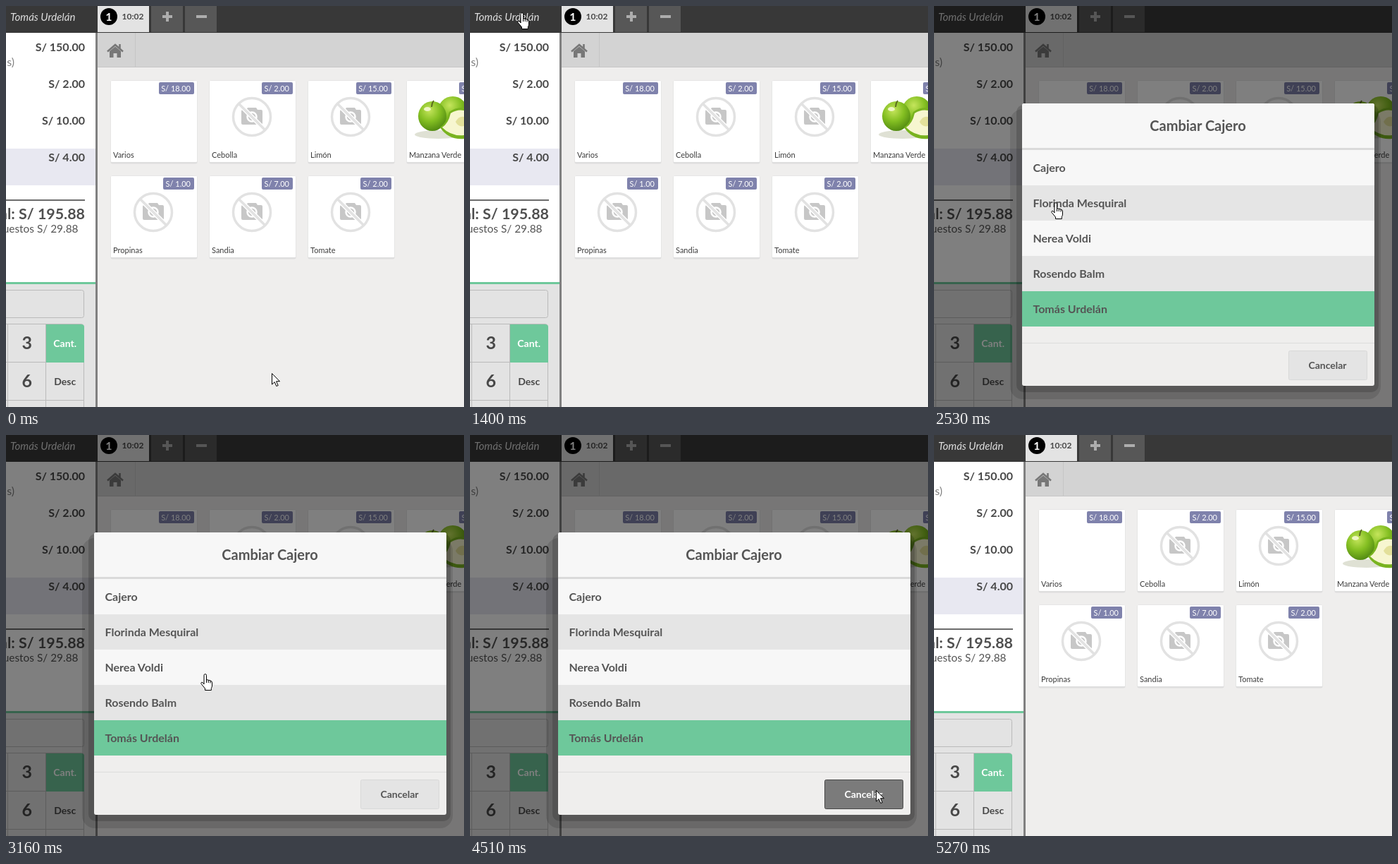
An HTML page for the animation above (5520 ms loop, 650 px wide and 568 px high).

```html
<!DOCTYPE html>
<html lang="es">
<head>
<meta charset="utf-8">
<title>Cambiar cajero</title>
<style>
html, body { margin: 0; width: 100%; height: 100%; overflow: hidden; background: #efeeed; }
svg { display: block; width: 650px; height: 568px; font-family: Lato, "Open Sans", sans-serif; }
</style>
</head>
<body>
<svg id="stage" viewBox="0 0 650 568" xmlns="http://www.w3.org/2000/svg"></svg>
<script>
const LOOP = 5520, STEP = 120;
const GREEN = '#6ec89b', INK = '#484848';
const CASHIER = 'Tomás Urdelán';

const rect = (x, y, w, h, fill, extra = '') =>
  `<rect x="${x}" y="${y}" width="${w}" height="${h}" fill="${fill}" ${extra}/>`;
const path = (d, fill, extra = '') => `<path d="${d}" fill="${fill}" ${extra}/>`;
const ellipse = (x, y, rx, ry, fill, extra = '') =>
  `<ellipse cx="${x}" cy="${y}" rx="${rx}" ry="${ry}" fill="${fill}" ${extra}/>`;
const text = (str, x, y, size, fill, { bold = false, anchor = 'start', extra = '' } = {}) =>
  `<text x="${x}" y="${y}" font-size="${size}" fill="${fill}" font-weight="${bold ? 700 : 400}" text-anchor="${anchor}" ${extra}>${str}</text>`;

const boldEnd = { bold: true, anchor: 'end' };
const boldMid = { bold: true, anchor: 'middle' };

function header() {
  return rect(0, 0, 650, 38, '#383838') +
    text(CASHIER, 6, 21, 15, '#dedede', { extra: 'font-style="italic"' }) +
    rect(130, 0, 73, 37, '#e3e3e3') +
    ellipse(146, 15, 12, 12, '#000') +
    text('1', 146, 21, 16, '#fff', boldMid) +
    text('10:02', 164.5, 19, 12, INK, { bold: true }) +
    rect(206, 0, 45, 37, '#575757') + rect(254, 0, 45, 37, '#575757') +
    path('M222 15H236M229 8V22M270 15H285', 'none', 'stroke="#adadad" stroke-width="4"');
}

function order() {
  const prices = ['150.00', '2.00', '10.00', '4.00'];
  return rect(0, 38, 127, 353, '#fff') +
    rect(0, 202, 127, 52, '#e8e8f1') +
    prices.map((p, i) => text('S/ ' + p, 112, 64 + 52 * i, 16, INK, boldEnd)).join('') +
    text('s)', 12, 85, 16, '#808080', { anchor: 'end' }) +
    rect(0, 274, 112, 2, '#6c6c6c') +
    text('Total: S/ 195.88', 112, 301.5, 21.4, '#505050', boldEnd) +
    text('Impuestos S/ 29.88', 102.5, 321, 15.4, '#555', { anchor: 'end' });
}

function keypad() {
  return rect(0, 391, 127, 177, '#e3e3e3') + rect(0, 391, 127, 3, GREEN) +
    rect(-20, 402.5, 130.5, 39, '#e3e3e3', 'rx="3" stroke="#bababa"') +
    path('M0 450.5H106Q110.5 450.5 110.5 455V568M2.5 450V568M56.5 450V568M0 504.5H111M0 558.5H111', 'none', 'stroke="#bababa"') +
    path('M57 451H107Q111 451 111 455V505H57Z', GREEN) +
    text('3', 29.7, 486, 25, INK, boldMid) + text('6', 29.7, 540, 25, INK, boldMid) +
    text('Cant.', 83.7, 483, 14, '#fff', boldMid) + text('Desc', 83.7, 537, 14, INK, boldMid) +
    rect(127, 38, 3, 530, '#808080');
}

function homeBar() {
  return rect(130, 38, 520, 49, '#d3d3d3') + rect(130, 86, 520, 1, '#c6c6c6') +
    rect(183, 38, 1, 48, '#c6c6c6') +
    path('M147 64L155 57.5 163 64V73H157.5V67H152.5V73H147Z', '#777') +
    path('M144 64.5L155 55 166 64.5M161.5 54V60', 'none', 'stroke="#777" stroke-width="2.6"');
}

// "No picture" sign, centred on (x, y)
function noPhoto(x, y) {
  return `<g transform="translate(${x} ${y})">` +
    path('M-13 -10H-8L-6 -13H6L8 -10H13Q15 -10 15 -8V9Q15 11 13 11H-13Q-15 11 -15 9V-8Q-15 -10 -13 -10Z', '#c7c7c7') +
    ellipse(0, 0, 6.5, 6.5, '#c7c7c7', 'stroke="#fff" stroke-width="2.5"') +
    path('M-20 -20L20 20', 'none', 'stroke="#fff" stroke-width="6.5"') +
    path('M-19 -19L19 19', 'none', 'stroke="#e2e2e2" stroke-width="3.5"') +
    ellipse(0, 0, 26.5, 26.5, 'none', 'stroke="#e2e2e2" stroke-width="3.5"') + '</g>';
}

function apples() {
  return ellipse(614, 182, 34, 6, '#dfe1d4') +
    ellipse(634, 149, 21, 21, 'url(#apple)') +
    ellipse(605, 156, 20, 21, 'url(#apple)') +
    ellipse(598, 146, 5, 3, '#eef6c4') +
    path('M604 143Q604 138 607 134', 'none', 'stroke="#5b6a20" stroke-width="2"') +
    path('M616 172Q625 166 629 150Q638 143 650 144V188Q628 190 616 172Z', '#79b31f') +
    path('M619 172Q628 166 631 152Q640 146 650 148V183Q632 185 619 172Z', '#f7f6d0') +
    path('M638 164Q643 155 650 157V170Q642 172 638 164Z', '#e3e09a');
}

function card(name, price, col, row, picture) {
  const x = 149 + 140 * col, y = 106 + 135 * row;
  const badge = price.length > 4 ? 50 : 44;
  return rect(x - .5, y - .5, 123, 118, '#dedede', 'rx="2"') +
    rect(x, y, 122, 115, '#fff', 'rx="1"') +
    picture(x + 60, y + 51) +
    rect(x + 118 - badge, y + 2, badge, 17, '#7f82ac', 'rx="2"') +
    text('S/ ' + price, x + 113, y + 15, 11, '#fff', { anchor: 'end' }) +
    text(name, x + 3, y + 109, 11, '#3c3c3c');
}

function products() {
  return rect(130, 87, 520, 481, '#efeeed') +
    card('Varios', '18.00', 0, 0, () => '') +
    card('Cebolla', '2.00', 1, 0, noPhoto) +
    card('Limón', '15.00', 2, 0, noPhoto) +
    card('Manzana Verde', '4.00', 3, 0, apples) +
    card('Propinas', '1.00', 0, 1, noPhoto) +
    card('Sandia', '7.00', 1, 1, noPhoto) +
    card('Tomate', '2.00', 2, 1, noPhoto);
}

function dialog() {
  const people = ['Cajero', 'Florinda Mesquiral', 'Nerea Voldi', 'Rosendo Balm', CASHIER];
  const rows = people.map((name, i) => {
    const fill = name === CASHIER ? GREEN : i % 2 ? '#e5e5e5' : '#f7f7f7';
    return rect(125, 204 + 50 * i, 500, 50, fill) +
      text(name, 140.5, 235 + 50 * i, 16, '#555', { bold: true });
  });
  return rect(0, 0, 650, 568, '#000', 'opacity=".5"') +
    rect(108, 146, 526, 411, '#000', 'rx="18" opacity=".12"') +
    rect(117, 140, 514, 407, '#000', 'rx="10" opacity=".16"') +
    rect(125, 138, 500, 400, '#efeeed', 'rx="3"') +
    path('M125 201V141Q125 138 128 138H622Q625 138 625 141V201Z', '#f7f7f7') +
    rect(125, 201, 500, 3, '#dadada') +
    text('Cambiar Cajero', 374.5, 177, 20, '#555', boldMid) +
    rows.join('') +
    rect(125, 477, 500, 1, '#dcdcdc') +
    rect(503.5, 488.5, 111, 41, '', 'rx="2" id="cancel"') +
    text('Cancelar', 558.5, 514, 14, '', { ...boldMid, extra: 'id="cancelText"' });
}

function cursors() {
  const line = 'stroke="#000" stroke-linejoin="round"';
  return path('M.5 .5V16L4.2 12.6 6.8 18.5 9.2 17.5 6.6 11.7H11.5Z', '#fff', line + ' id="arrow"') +
    `<g id="hand">` +
    path('M5 15V2.4a1.75 1.75 0 0 1 3.5 0V8.5L14 9.9q2.5 .6 2.5 3.1V17q0 2-1.2 3.6V23.5H6.5V21L1.2 14.6q-1-1.7 .4-2.3 1.6-.6 3.4 2.7Z', '#fff', line) +
    path('M8.5 8V13M11.2 9.5V13M14 10.2V13.5', 'none', line) + '</g>';
}

const stage = document.getElementById('stage');
stage.innerHTML =
  `<defs><radialGradient id="apple" cx=".4" cy=".3" r=".75"><stop offset="0" stop-color="#c5e55c"/>
   <stop offset=".5" stop-color="#84bf22"/><stop offset="1" stop-color="#4d8510"/></radialGradient></defs>` +
  products() + homeBar() + order() + keypad() + header() +
  `<g id="dialog">${dialog()}</g>` + cursors();

const parts = Object.fromEntries(
  ['dialog', 'cancel', 'cancelText', 'arrow', 'hand'].map(id => [id, document.getElementById(id)]));

// Pointer moves: start time, then one position per step
const moves = [
  [0, [377, 520]],
  [530, [330, 508], [266, 467]],
  [800, [252, 425], [205, 315], [155, 190], [108, 75], [73, 19]],
  [1400, [67, 9]],
  [1770, [73, 9]],
  [2020, [78, 48], [98, 135], [114, 198]],
  [2410, [134, 232], [166, 278], [196, 318], [213, 336]],
  [2920, [242, 354], [268, 357], [276, 338], [256, 274], [208, 237]],
  [3520, [256, 233], [308, 303]],
  [3790, [350, 350], [425, 410], [505, 460], [553, 490], [572, 500]],
  [4390, [571, 503], [576, 503], [576, 503], [572, 504]],
  [5030, [578, 518], [586, 547], [586, 580]],
];

const within = (t, from, to) => t >= from && t < to;
const show = (node, on) => node.setAttribute('visibility', on ? 'visible' : 'hidden');

function pointerAt(t) {
  const [start, ...points] = moves.filter(m => m[0] <= t).pop();
  return points[Math.min(points.length - 1, Math.floor((t - start) / STEP))];
}

function draw(t) {
  const pressed = within(t, 4390, 4630);
  const pointing = within(t, 1280, 1770) || within(t, 2410, 4510);
  const place = `translate(${pointerAt(t).join(' ')})`;
  show(parts.dialog, within(t, 1770, 4630));
  parts.cancel.setAttribute('fill', pressed ? '#7b7b7b' : '#e4e4e4');
  parts.cancel.setAttribute('stroke', pressed ? '#484848' : '#d8d8d8');
  parts.cancelText.setAttribute('fill', pressed ? '#fff' : '#555');
  parts.arrow.setAttribute('transform', place);
  parts.hand.setAttribute('transform', place);
  show(parts.arrow, !pointing);
  show(parts.hand, pointing);
}

const began = performance.now();
function tick() {
  draw((performance.now() - began) % LOOP);
  requestAnimationFrame(tick);
}
tick();
</script>
</body>
</html>
```
